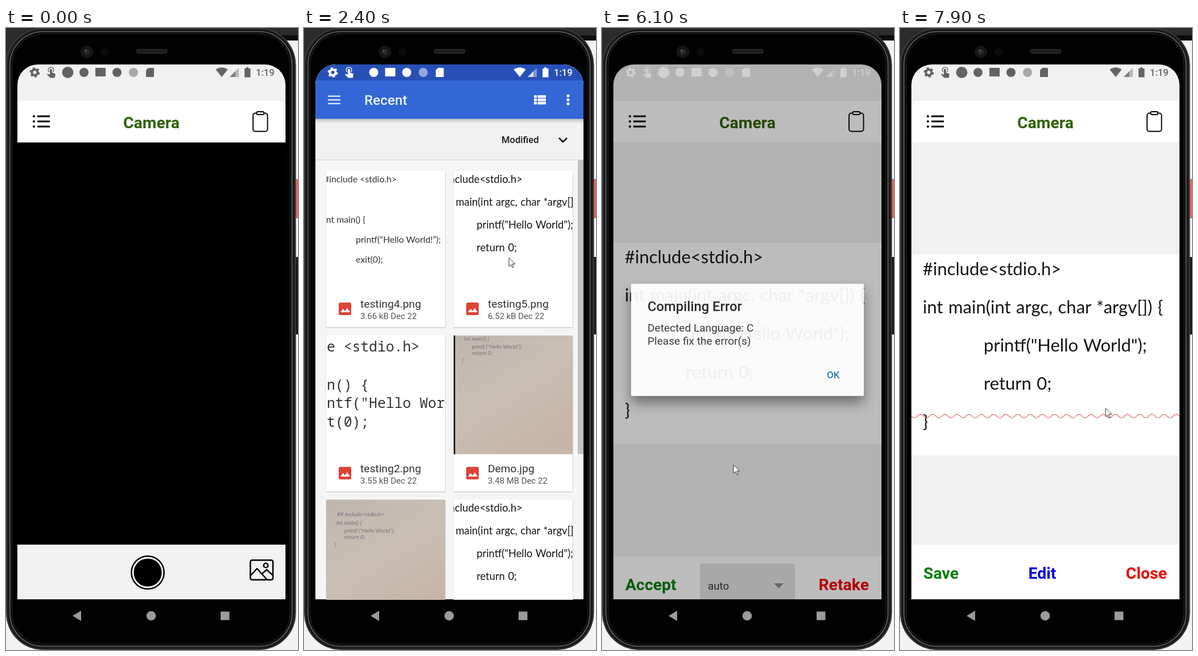
These frames come from a looping animation (513x1092 px, 8 s). An HTML page:

```html
<!DOCTYPE html>
<html lang="en">
<head>
<meta charset="utf-8">
<title>Code scanner demo</title>
<style>
  html, body { margin: 0; width: 100%; height: 100%; overflow: hidden; background: #f3f3f3; }
  #stage { display: block; width: 100vw; height: 100vh; }
  text { font-family: Roboto, sans-serif; }
  .medium { font-weight: 500; }
  .big { font-size: 28.4px; font-weight: 700; }
  .name { font-size: 19.2px; fill: #333; }
  .info { font-size: 14.9px; fill: #555; }
  .code text { font: 31px Lato, sans-serif; word-spacing: 1.5px; fill: #151515; }
  .small text { font: 15.8px Lato, sans-serif; fill: #333; }
  .mono text { font: 24.7px "Noto Sans Mono", monospace; fill: #333; }
  .hand text { font: italic 10px Lato, sans-serif; fill: #77727c; }
  .line { fill: none; stroke: #000; stroke-width: 2.5; stroke-linejoin: round; }
  .thin { stroke-width: 1.9; }
  #dialog { filter: drop-shadow(0 12px 11px rgba(0, 0, 0, .45)); }
</style>
</head>
<body>
<svg id="stage" viewBox="0 0 513 1092" preserveAspectRatio="none"></svg>
<script>
const LOOP = 8000, STEP = 100;

const clamp = v => Math.max(0, Math.min(1, v));
const progress = (t, start, length) => clamp((t - start) / length);
const mix = (a, b, k) => a + (b - a) * k;
const escapeText = s => s.replace(/&/g, '&amp;').replace(/</g, '&lt;');
const text = (x, y, s, attrs = '') => `<text x="${x}" y="${y}" ${attrs}>${escapeText(s)}</text>`;
const rect = (x, y, w, h, fill, attrs = '') =>
  `<rect x="${x}" y="${y}" width="${w}" height="${h}" fill="${fill}" ${attrs}/>`;
const circle = (x, y, r, attrs = '') => `<circle cx="${x}" cy="${y}" r="${r}" ${attrs}/>`;
const group = (id, body, attrs = '') => `<g id="${id}" ${attrs}>${body}</g>`;

// Phone body and fixed parts
const phone = `
  ${rect(0, 0, 513, 1092, '#f3f3f3')}
  ${rect(0, 0, 513, 21, '#2b2b2b')}${rect(0, 13, 513, 9, '#0b0b0b')}
  ${rect(0, 0, 40, 300, '#2b2b2b')}
  ${rect(503, 265, 14, 69, '#e8695f', 'rx="3"')}
  ${rect(505, 402, 12, 136, '#17181a', 'rx="3"')}
  ${rect(.5, .5, 508.5, 1091, '#2a2b2d', 'rx="64" stroke="#4a4b4d"')}
  ${rect(4, 3.5, 501.5, 1085, '#0c0c0d', 'rx="61" stroke="#1b1c1e" stroke-width="3"')}
  ${rect(7, 6.5, 495.5, 1079, '#000', 'rx="58" stroke="#6c6d70" stroke-width="1.6"')}
  ${rect(10.5, 10, 488.5, 1072, '#020202', 'rx="54" stroke="#151515" stroke-width="3"')}
  ${circle(142, 42, 11, 'fill="#161616"')}${circle(142, 42, 5, 'fill="#292929"')}
  ${circle(140, 40, 1.6, 'fill="#666"')}${circle(173, 42, 7, 'fill="#0c0c0c"')}
  ${rect(229, 37.5, 54, 7, '#1d1d1d', 'rx="3" stroke="#333"')}
  <g fill="#9b9b9b"><path d="M117 1032l15-9v18z"/>${circle(255, 1032, 8.3)}
  ${rect(377, 1024.5, 15.5, 15, '#9b9b9b')}</g>`;

// Shared program listing, 471 by 353
const listing = group('code', rect(0, 0, 471, 353, '#fff') +
  [[20, '#include<stdio.h>'], [20, 'int main(int argc, char *argv[]) {'],
   [127, 'printf("Hello World");'], [127, 'return 0;'], [20, '}']]
    .map(([x, s], i) => text(x, 36 + i * 67.2, s)).join(''), 'class="code"');

const header = `
  ${rect(20, 64, 471, 939, '#f1f1f1')}${rect(20, 128, 471, 72.5, '#fff')}
  ${[155, 164, 173].map(y => circle(49, y, 2.1) + rect(55, y - 1.5, 22, 3, '#000')).join('')}
  ${text(255.5, 176, 'Camera', 'class="big" fill="#2f6205" text-anchor="middle"')}
  <g class="line thin">${rect(434, 149.5, 25.5, 32, 'none', 'rx="4"')}
  ${rect(440.5, 147, 12.5, 5, '#fff', 'rx="1.5"')}</g>`;

const viewfinder = group('viewfinder', `
  ${rect(20, 201, 471, 706, '#000')}
  ${circle(249, 956, 28.7, 'fill="#fff" stroke="#000" stroke-width="2.5"')}${circle(249, 956, 24.6)}
  <g class="line">${rect(429.3, 934.3, 39.7, 34.5, 'none', 'rx="3"')}${circle(456.5, 943.5, 3.8)}
  <path d="M430 961l11-12 18 20M450 958l8-7 11 10"/></g>`);

const preview = group('preview', `
  <use href="#code" x="20" y="377"/>
  ${rect(20, 928, 471, 75, '#fff')}
  ${text(41, 987, 'Accept', 'class="big" id="accept" fill="#0a7d0a"')}
  <path d="M172 1003V943q0-3 3-3H336q3 0 3 3V1003z" fill="#e4e4e4"/>
  ${text(186, 986, 'auto', 'font-size="18.8" fill="#333"')}
  <path d="M302 975h17l-8.500 8.500z" fill="#888"/>
  ${text(469, 987, 'Retake', 'class="big" fill="#f00000" text-anchor="end"')}`);

const wave = Array.from({ length: 472 }, (_, x) =>
  `${x + 20} ${(681.3 + 3 * Math.sin(x / 21.4 * 2 * Math.PI)).toFixed(1)}`).join('L');
const result = group('result', `
  <use href="#code" x="20" y="397.500"/>
  <path d="M${wave}" fill="none" stroke="#e65a5a" stroke-width="1.1"/>
  ${rect(20, 907, 471, 96, '#fff')}
  ${text(41, 967, 'Save', 'class="big" fill="#0a7d0a"')}
  ${text(250, 967, 'Edit', 'class="big" fill="#0000e6" text-anchor="middle"')}
  ${text(469, 967, 'Close', 'class="big" fill="#f00000" text-anchor="end"')}`);

// File picker
const lines = (cls, rows) =>
  `<g class="${cls}">${rows.map(([x, y, s]) => text(x, y, s)).join('')}</g>`;
const paper = rect(0, 0, 209, 209, 'url(#paper)');
const scribble = (x, y) => lines('hand', [
  [x + 4, y, 'int main() {'], [x + 18, y + 14, 'printf ("Hello World");'],
  [x + 18, y + 25, 'return 0;'], [x, y + 38, '}']]);
const codeThumb = '<use href="#code" transform="translate(-35 0) scale(.592)"/>';
const thumbs = {
  spaced: lines('small', [[-4, 20, '#include <stdio.h>'], [-4, 91, 'int main() {'],
    [52, 126, 'printf(“Hello World!”);'], [52, 161, 'exit(0);']]),
  mono: lines('mono', [[1, 28, 'e <stdio.h>'], [1, 95, 'n() {'],
    [1, 127, 'ntf("Hello Wor'], [1, 160, 't(0);']]),
  photo: paper + rect(0, 0, 2.5, 209, '#111') + scribble(14, 9),
  note: paper + lines('hand', [[19, 29, '## include<stdio.h>']]) + scribble(14, 44),
};

function card(col, row, thumb, name, info) {
  const x = 39 + col * 224, y = 251 + row * 288.5;
  return `<g transform="translate(${x} ${y})">
    ${rect(-.5, 1, 210.5, 275, '#d8d8d8', 'rx="2"')}${rect(0, 0, 209, 274, '#fff', 'rx="1"')}
    <svg width="209" height="209">${thumb}</svg>
    ${rect(22, 231, 22, 22, '#db4437', 'rx="2.500"')}
    <path d="M25 248l4.500-6 3.500 4 4-5.500 5 7.500z" fill="#fff"/>
    ${text(60, 240, name, 'class="name"')}${text(60, 260, info, 'class="info"')}</g>`;
}

const picker = group('picker', `<g clip-path="url(#page)">
  ${rect(20, 64, 471, 939, '#f5f5f5')}
  ${rect(20, 160, 471, 71, '#f1f1f1')}${rect(20, 231, 471, 1.2, '#d2d2d2')}
  ${rect(20, 159, 471, 9, 'url(#shade)')}
  ${rect(20, 60, 471, 32, '#2850b8')}${rect(20, 92, 471, 67.5, '#3367d6')}
  ${[118.5, 125, 131.5].map(y => rect(42, y, 22, 2.4, '#dfe7f8')).join('')}
  ${text(106, 135, 'Recent', 'class="medium" font-size="24.2" fill="#eef2fc"')}
  ${[118, 123.8, 129.6].map(y => rect(404, y, 5, 4.6, '#fff') + rect(410.5, y, 14.5, 4.6, '#fff')).join('')}
  ${[119, 126, 133].map(y => circle(464, y, 2.6, 'fill="#fff"')).join('')}
  ${text(347, 202, 'Modified', 'class="medium" font-size="16.600" fill="#1d1d1d"')}
  <path class="line" d="M448 193l7 7 7-7"/>
  ${group('files',
    card(0, 0, thumbs.spaced, 'testing4.png', '3.66 kB Dec 22') +
    card(1, 0, codeThumb, 'testing5.png', '6.52 kB Dec 22') +
    card(0, 1, thumbs.mono, 'testing2.png', '3.55 kB Dec 22') +
    card(1, 1, thumbs.photo, 'Demo.jpg', '3.48 MB Dec 22') +
    card(0, 2, thumbs.note, '', '') + card(1, 2, codeThumb, '', '') +
    rect(481, 232, 10, 516, '#c1c1c1'))}</g>`);

const dialog = group('dialog', `
  ${rect(51, 449, 409, 197, '#fff', 'rx="2"')}
  ${text(80, 497, 'Compiling Error', 'class="medium" font-size="23.800" fill="#212121"')}
  ${text(80, 533, 'Detected Language: C', 'font-size="19.100" fill="#333"')}
  ${text(80, 556, 'Please fix the error(s)', 'font-size="19.100" fill="#333"')}
  ${text(395, 615, 'OK', 'class="medium" font-size="17" fill="#2878b4"')}`);

const status = group('status', `
  ${circle(50.5, 78, 5, 'fill="none" stroke="currentColor" stroke-width="4"')}
  ${circle(50.5, 78, 7.6, 'fill="none" stroke="currentColor" stroke-width="2.600" stroke-dasharray="3.980"')}
  <path d="M77 82V73.500a1.900 1.900 0 0 1 3.800 0V78l6 2.500-1 7h-8l-6-6 1.500-1z"/>
  <path d="M75.500 77a4.800 4.800 0 1 1 7 0" fill="none" stroke="currentColor" stroke-width="1.500"/>
  ${circle(108.5, 78, 10, 'id="app"')}
  ${group('tray', `${circle(137, 78, 8)}${rect(157, 70, 18, 15, 'currentColor')}
    ${circle(195, 78, 8)}${circle(224, 78, 8, 'opacity=".5"')}
    <path d="M250 70h9q1 0 1 1v14q0 1-1 1h-12q-1 0-1-1V74z"/>`)}
  <path d="M368.500 73q10.500-7.500 21 0L379 86z"/>
  <path d="M393 86l16-16v16z" opacity=".4"/><path d="M393 86l10-10v10z" opacity=".7"/>
  <path d="M419 71h3v-2h4v2h3.500v15.500H419z"/>
  ${text(439, 84, '1:19', 'class="medium" font-size="16.600"')}`, 'fill="currentColor"');

stage.innerHTML = `
  <defs>
    <clipPath id="screen"><path d="M20 1008V100A36 36 0 0 1 56 64H455A36 36 0 0 1 491 100V1008z"/></clipPath>
    <clipPath id="page"><rect x="20" y="60" width="471" height="943.500"/></clipPath>
    <linearGradient id="paper" x1="0" y1="0" x2=".6" y2="1">
      <stop stop-color="#bfb6af"/><stop offset=".5" stop-color="#cabeb3"/><stop offset="1" stop-color="#c7b6a7"/>
    </linearGradient>
    <linearGradient id="shade" x2="0" y2="1">
      <stop stop-color="#000" stop-opacity=".2"/><stop offset="1" stop-opacity="0"/>
    </linearGradient>
    ${listing}
  </defs>
  ${phone}
  <g clip-path="url(#screen)">
    ${header}${viewfinder}${preview}${result}${picker}
    ${rect(20, 64, 471, 939, '#000', 'id="scrim"')}${dialog}${status}
  </g>
  <path id="cursor" d="M0 0V15l3.500-3.300 2.500 5.600 2.300-1-2.500-5.500H11z" fill="#fff" stroke="#333" stroke-width="1"/>`;

const el = id => document.getElementById(id);
const fade = (id, opacity) => el(id).setAttribute('opacity', opacity);
const show = (id, on) => el(id).setAttribute('display', on ? 'inline' : 'none');
const move = (id, x, y) => el(id).setAttribute('transform', `translate(${x} ${y})`);

// Pointer stops: time, x, y
const stops = [
  [800, 500, 1029], [900, 433, 963.5], [1300, 433, 963.5], [1700, 492, 720], [2200, 360, 403.5],
  [2500, 360, 403.5], [3200, 430, 900], [3500, 90, 974], [3600, 90, 974], [3900, 231, 767],
  [6500, 231, 767], [6700, 409, 624], [6800, 409, 624], [6900, 401, 615], [7400, 401, 615], [7800, 361, 667.5],
];

function pointerAt(t) {
  const next = stops.findIndex(s => s[0] > t);
  if (next < 0) return stops[stops.length - 1].slice(1);
  if (next === 0) return stops[0].slice(1);
  const [t0, x0, y0] = stops[next - 1], [t1, x1, y1] = stops[next];
  const k = progress(t, t0, t1 - t0);
  return [mix(x0, x1, k), mix(y0, y1, k)];
}

function render(t) {
  show('viewfinder', t < 2800);
  show('preview', t >= 2800 && t < 7300);
  show('result', t >= 7300);
  fade('accept', t >= 3500 && t < 3700 ? .4 : 1);

  const opened = progress(t, 850, 250), closed = progress(t, 2400, 300);
  const pickerAlpha = Math.min(clamp(opened * 1.7), 1 - closed);
  show('picker', pickerAlpha > 0);
  fade('picker', pickerAlpha);
  move('picker', 0, 60 * (1 - opened) ** 3 + 50 * closed ** 2);
  fade('files', progress(t, 1100, 300));

  const rise = 1 - (1 - progress(t, 6000, 400)) ** 2;
  const dim = rise * (1 - progress(t, 7100, 300));
  show('dialog', dim > 0);
  fade('scrim', .6 * dim);
  fade('dialog', clamp(dim * 2.12));

  const light = Math.max(Math.min(clamp(opened * 1.25), 1 - closed), clamp(dim * 1.6));
  const tone = Math.round(mix(99, 255, light));
  el('status').style.color = `rgb(${tone}, ${tone}, ${tone})`;
  const room = Math.max(1 - progress(t, 800, 200), progress(t, 2300, 200));
  move('tray', 29 * (room - 1), 0);
  fade('app', room === 1 ? 1 : 0);

  show('cursor', t >= 800);
  move('cursor', ...pointerAt(t));
}

const begin = performance.now();
function tick() {
  const t = (performance.now() - begin) % LOOP;
  render(Math.floor(t / STEP) * STEP);
  requestAnimationFrame(tick);
}
tick();
</script>
</body>
</html>
```
